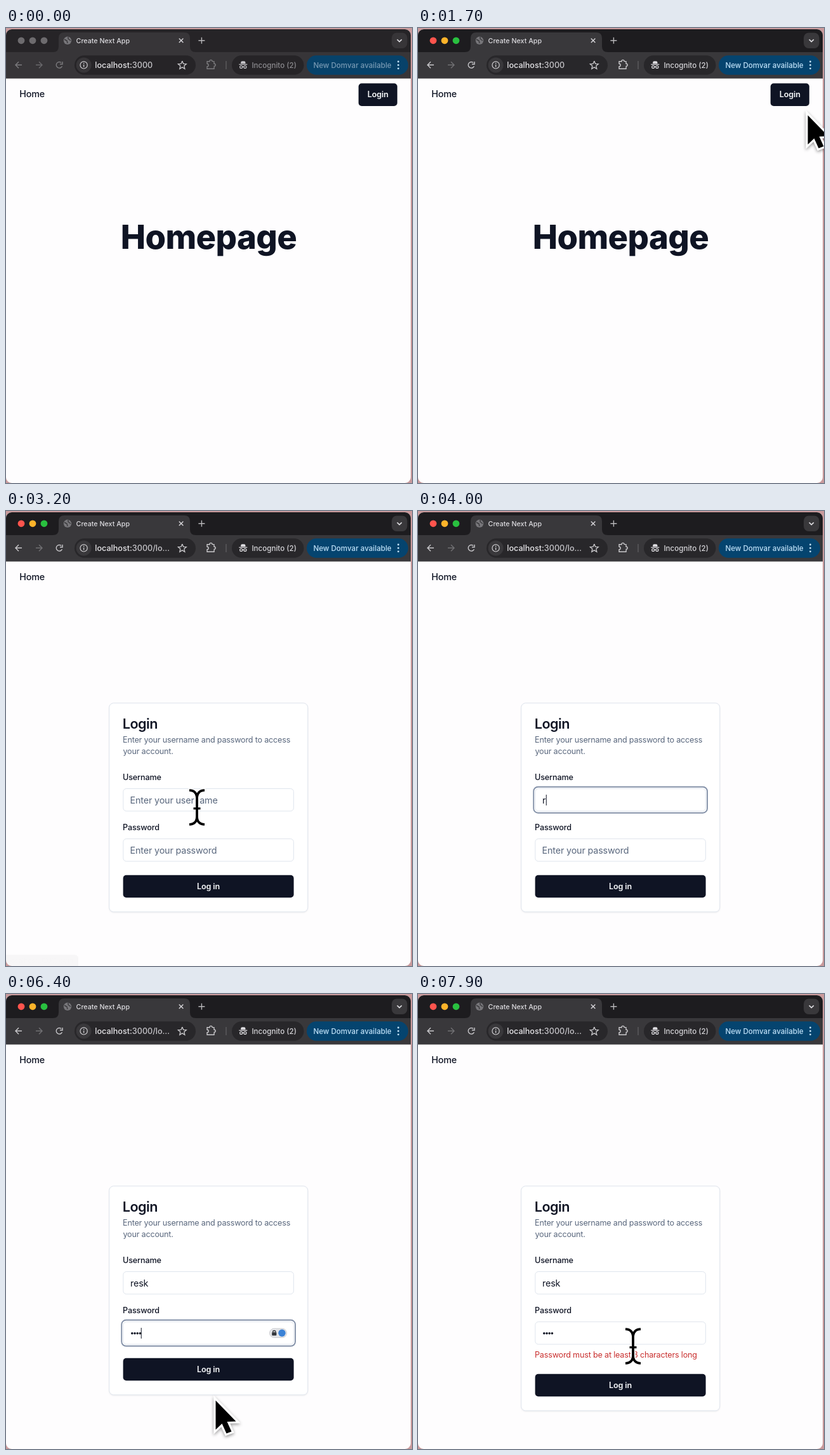
Animation of 640x717 px, one loop 8000 ms. Source, as an HTML page with a canvas:

```html
<!DOCTYPE html>
<html lang="en">
<head>
<meta charset="utf-8">
<title>Login flow</title>
<style>
html, body { margin: 0; width: 100%; height: 100%; overflow: hidden; background: #c99a9c; }
canvas { display: block; width: 640px; height: 717px; }
</style>
</head>
<body>
<canvas id="stage"></canvas>
<script>
const W = 640, H = 717, LOOP = 8000;
const canvas = document.getElementById('stage');
const ctx = canvas.getContext('2d');
const dpr = window.devicePixelRatio || 1;
canvas.width = W * dpr;
canvas.height = H * dpr;

const INK = '#0f1424', MUTED = '#59677d', BORDER = '#dfe5ed';
const T = {
  active: 500, selectStart: 520, deselect: 1250, hover: 1900, page: 2400,
  user: 3500, pass: 4600, submit: 6900, error: 7100
};
const userKeys = [4000, 4110, 4220, 4330];
const passKeys = [5100, 5200, 5300, 5400];
const userName = 'resk';

// Pointer tracks: [time, x, y]
const tracks = [
  [[250, 600, 300], [500, 252, 335], [900, 443, 342], [1200, 443, 342], [1700, 614, 137],
   [1950, 590, 108], [2500, 590, 108], [3200, 301, 467], [4000, 301, 467]],
  [[5900, 301, 467], [6400, 330, 640], [6800, 325, 600], [7100, 325, 600],
   [7800, 339, 555], [8000, 339, 555]]
];

const clamp = v => Math.max(0, Math.min(1, v));
const ease = v => v * v * (3 - 2 * v);
const countDone = (keys, t) => keys.filter(k => t >= k).length;

function box(x, y, w, h, r, fill, stroke, lw = 1) {
  ctx.beginPath();
  ctx.roundRect(x, y, w, h, r);
  if (fill) { ctx.fillStyle = fill; ctx.fill(); }
  if (stroke) { ctx.strokeStyle = stroke; ctx.lineWidth = lw; ctx.stroke(); }
}

function disc(x, y, r, fill) {
  ctx.beginPath();
  ctx.arc(x, y, r, 0, 7);
  ctx.fillStyle = fill;
  ctx.fill();
}

function ring(x, y, r, color, lw = 1.3, from = 0, to = Math.PI * 2) {
  ctx.beginPath();
  ctx.arc(x, y, r, from, to);
  ctx.strokeStyle = color;
  ctx.lineWidth = lw;
  ctx.stroke();
}

function line(color, lw, ...pts) {
  ctx.beginPath();
  pts.forEach(([x, y], i) => i ? ctx.lineTo(x, y) : ctx.moveTo(x, y));
  ctx.strokeStyle = color;
  ctx.lineWidth = lw;
  ctx.stroke();
}

function setFont(size, weight, track) {
  ctx.font = `${weight} ${size}px Inter, "Open Sans", sans-serif`;
  ctx.letterSpacing = track * size + 'px';
}

function text(str, x, y, size, color, weight = 400, track = 0, align = 'left') {
  setFont(size, weight, track);
  ctx.textAlign = align;
  ctx.fillStyle = color;
  ctx.fillText(str, x, y);
}

function navArrow(x, y, dir, color) {
  line(color, 1.4, [x - 5 * dir, y], [x + 5 * dir, y]);
  line(color, 1.4, [x, y - 5], [x + 5 * dir, y], [x, y + 5]);
}

function star(x, y, r, color) {
  const pts = [];
  for (let i = 0; i <= 10; i++) {
    const a = -Math.PI / 2 + i * Math.PI / 5, d = i % 2 ? r * .45 : r;
    pts.push([x + d * Math.cos(a), y + d * Math.sin(a)]);
  }
  line(color, 1.3, ...pts);
}

function puzzle(x, y, color) {
  ctx.beginPath();
  ctx.moveTo(x - 6, y - 4.5);
  ctx.lineTo(x - 2, y - 4.5);
  ctx.arc(x, y - 4.9, 2, Math.PI, 0);
  ctx.lineTo(x + 5, y - 4.5);
  ctx.lineTo(x + 5, y - 1);
  ctx.arc(x + 5.2, y + 1, 2, -Math.PI / 2, Math.PI / 2);
  ctx.lineTo(x + 5, y + 7);
  ctx.lineTo(x - 6, y + 7);
  ctx.lineTo(x - 6, y + 3.5);
  ctx.arc(x - 6, y + 1.2, 2.2, Math.PI / 2, -Math.PI / 2, true);
  ctx.closePath();
  ctx.strokeStyle = color;
  ctx.lineWidth = 1.4;
  ctx.stroke();
}

function hatIcon(x, y, color) {
  box(x - 3.6, y - 5.8, 7.2, 4, [2, 2, 0, 0], color);
  line(color, 1.3, [x - 6.5, y - .6], [x + 6.5, y - .6]);
  ring(x - 3.1, y + 3.4, 2, color, 1.2);
  ring(x + 3.1, y + 3.4, 2, color, 1.2);
  line(color, 1.1, [x - 1.2, y + 3], [x + 1.2, y + 3]);
}

function drawBrowser(t) {
  const on = t >= T.active;
  const strip = on ? '#1d1c1f' : '#262427';
  const bar = on ? '#39383b' : '#373538';
  const well = on ? '#28272a' : '#262427';
  const icon = on ? '#c9c8cb' : '#7c7b7e';
  const faint = on ? '#717073' : '#69686b';

  ctx.fillStyle = strip;
  ctx.fillRect(0, 2, 638, 36);
  const lights = on ? ['#ff544d', '#fdb32a', '#29c03f'] : ['#6d6b6e', '#6d6b6e', '#6d6b6e'];
  lights.forEach((c, i) => disc(24 + i * 18, 19.8, 5.4, c));

  ctx.beginPath();
  ctx.moveTo(74, 38);
  ctx.quadraticCurveTo(83, 38, 83, 29);
  ctx.lineTo(83, 16);
  ctx.quadraticCurveTo(83, 7, 92, 7);
  ctx.lineTo(281, 7);
  ctx.quadraticCurveTo(290, 7, 290, 16);
  ctx.lineTo(290, 29);
  ctx.quadraticCurveTo(290, 38, 299, 38);
  ctx.fillStyle = bar;
  ctx.fill();
  ctx.fillRect(0, 38, 638, 41.6);

  disc(97, 19.8, 6.2, '#77767a');
  line(bar, 1.4, [92, 18], [96, 20], [97, 24]);
  line(bar, 1.4, [98, 14], [98, 17], [102, 20]);
  text('Create Next App', 110.6, 23.5, 10.7, '#dddce0', 500);
  line('#d5d4d8', 1.4, [272.8, 16.5], [279.4, 23.1]);
  line('#d5d4d8', 1.4, [279.4, 16.5], [272.8, 23.1]);
  line('#b9b8bb', 1.4, [303.4, 19.8], [313.4, 19.8]);
  line('#b9b8bb', 1.4, [308.4, 14.8], [308.4, 24.8]);
  box(608, 7.5, 24.5, 24.5, 8, bar);
  line('#dddce0', 1.6, [616.6, 18.2], [620.2, 21.6], [623.8, 18.2]);

  navArrow(20, 58.3, -1, icon);
  navArrow(52, 58.3, 1, faint);
  ring(84, 58.3, 4.8, icon, 1.4, .4, 5.4);
  line(icon, 1.4, [89, 53], [89, 57], [85, 57]);

  box(108, 43.3, 191, 30.4, 15.2, well);
  disc(122.6, 58.4, 12, bar);
  ring(122.6, 58.4, 5.6, '#d0cfd2', 1.2);
  line('#d0cfd2', 1.3, [122.6, 57.8], [122.6, 61.4]);
  line('#d0cfd2', 1.3, [122.6, 55.1], [122.6, 56.4]);
  const host = 'localhost:';
  text(host, 140.3, 62.8, 12.6, '#e6e5e8', 450);
  const hostW = ctx.measureText(host).width;
  text(t < T.page ? '3000' : '3000/lo…', 140.3 + hostW, 62.8, 12.6, '#c7c6ca', 450);
  star(277.8, 58.8, 6.8, '#c9c8cb');

  puzzle(323, 57.3, icon);
  line('#646366', 1.2, [347, 52], [347, 65]);
  box(356, 43.3, 113.5, 30.4, 15.2, well);
  hatIcon(373.8, 58, on ? '#dddce0' : '#c5c4c8');
  text('Incognito (2)', 387.4, 62.7, 11.6, on ? '#d6d5d9' : '#8b8a8e', 500);

  box(474, 43.3, 160, 30.4, 15.2, on ? '#05446f' : '#07426a');
  text('New Domvar available', 484.4, 62.7, 11.6, on ? '#bfe1f8' : '#7799b3', 500);
  [53, 58.4, 63.8].forEach(y => disc(618.4, y, 1.4, '#c5e4f8'));
}

function drawHome(t) {
  const hover = t >= T.hover;
  box(555.7, 87.2, 61.1, 35.8, 5, hover ? '#272c3a' : INK);
  text('Login', 586.3, 109.2, 12.6, '#f8fafc', 600, -.01, 'center');

  const size = 52.6, track = -.012, word = 'Homepage';
  setFont(size, 800, track);
  const width = s => ctx.measureText(s).width;
  const x = 319.5 - width(word) / 2;
  if (t >= T.selectStart && t < T.deselect) {
    const n = 2 + Math.ceil(3 * clamp((t - T.selectStart) / 300));
    const a = x + width(word.slice(0, 2)), b = x + width(word.slice(0, n));
    ctx.fillStyle = '#a9d0fd';
    ctx.fillRect(a, 298.5, b - a, 61);
  }
  text(word, x, 348, size, INK, 800, track);
}

function drawCaret(x, y, t, since) {
  if ((t - since) % 1000 < 500) {
    ctx.fillStyle = INK;
    ctx.fillRect(x, y - 8.5, 1, 17);
  }
}

function drawField(y, focused) {
  box(184.8, y, 268.6, 35.4, 5, '#fff', BORDER);
  if (focused) box(182.2, y - 2.8, 273.8, 41, 7, null, '#8592a9', 1.9);
}

function drawKeyBadge(t) {
  const k = ease(clamp((t - 4650) / 500));
  const s = .72 + .28 * k;
  ctx.save();
  ctx.globalAlpha = k;
  ctx.translate(429, 534.3);
  ctx.scale(s, s);
  box(-13.5, -7.2, 27, 14.4, 7.2, '#e4e5e8', '#c3c5ca', .8);
  box(-9.8, -1.4, 7.2, 5.4, 1, '#33363b');
  ring(-6.2, -1.5, 2.3, '#33363b', 1.4, Math.PI, 0);
  disc(6, 0, 5.7, '#3b82d6');
  ctx.restore();
}

function drawLogin(t) {
  const push = t >= T.error ? 25 : 0;
  ctx.save();
  ctx.shadowColor = 'rgba(15,20,36,.09)';
  ctx.shadowBlur = 3;
  ctx.shadowOffsetY = 1;
  box(162.7, 302.7, 313, 329 + push, 7, '#fff');
  ctx.restore();
  box(162.7, 302.7, 313, 329 + push, 7, null, BORDER);

  text('Login', 183.8, 342.6, 21.6, INK, 600, -.025);
  text('Enter your username and password to access', 184, 364.9, 12.6, MUTED, 400, -.015);
  text('your account.', 184.4, 383, 12.6, MUTED, 400, -.015);

  const inUser = t >= T.user && t < T.pass;
  const inPass = t >= T.pass && t < T.submit;

  text('Username', 184, 424.3, 12.6, INK, 500, -.01);
  drawField(437.5, inUser);
  const typed = userName.slice(0, countDone(userKeys, t));
  text(typed || 'Enter your username', typed ? 196 : 195.6, 460.8, 14.3, typed ? INK : MUTED, 400, -.01);
  if (inUser) {
    const end = typed ? ctx.measureText(typed).width : 0;
    drawCaret(196.5 + end, 455.5, t, typed ? userKeys[typed.length - 1] : T.user);
  }

  text('Password', 184, 503, 12.6, INK, 500, -.01);
  drawField(516.6, inPass);
  const dots = countDone(passKeys, t);
  if (!dots) text('Enter your password', 195.6, 539.8, 14.3, MUTED, 400, -.01);
  for (let i = 0; i < dots; i++) disc(198.8 + i * 4.2, 534.8, 1.75, INK);
  if (inPass) {
    drawCaret(196.3 + dots * 4.1, 534.5, t, dots ? passKeys[dots - 1] : T.pass);
    drawKeyBadge(t);
  }

  if (push) text('Password must be at least 8 characters long', 184, 573, 12.6, '#c9302f', 400, -.015);
  box(184.6, 573.7 + push, 269, 35.6, 5, t >= 6780 && t < T.error ? '#272c3a' : INK);
  text('Log in', 319, 596.2 + push, 12.6, '#f8fafc', 600, -.01, 'center');
}

function drawStatus(t) {
  const alpha = clamp((t - T.hover) / 150) * clamp((3220 - t) / 600);
  if (!alpha) return;
  ctx.globalAlpha = alpha;
  box(0, 699.5, 114, 18, [0, 5, 0, 0], '#28272a');
  text('localhost:3000/login', 5, 712, 10.4, '#e3e2e5');
  ctx.globalAlpha = 1;
}

function pointerAt(t) {
  for (const track of tracks) {
    const i = track.findIndex(k => t < k[0]);
    if (i < 1) continue;
    const [t0, x0, y0] = track[i - 1], [t1, x1, y1] = track[i];
    const k = ease((t - t0) / (t1 - t0));
    return [x0 + (x1 - x0) * k, y0 + (y1 - y0) * k];
  }
  return null;
}

function overText(x, y, t) {
  const inside = (l, top, r, b) => x >= l && x <= r && y >= top && y <= b;
  if (t < T.page) return inside(178, 298, 461, 360);
  return inside(185, 437, 454, 473) || inside(185, 516, 454, t >= T.error ? 578 : 552);
}

function drawBeam(x, y) {
  ctx.save();
  ctx.translate(x, y);
  const pass = (color, stem, bar, pad) => {
    ctx.beginPath();
    for (const sx of [-1, 1]) {
      ctx.moveTo(sx * (12 + pad), -26.8);
      ctx.bezierCurveTo(sx * 4, -26.8, 0, -22, 0, -14);
      ctx.lineTo(0, 14);
      ctx.bezierCurveTo(0, 22, sx * 4, 26.8, sx * (12 + pad), 26.8);
    }
    ctx.strokeStyle = color;
    ctx.lineWidth = stem;
    ctx.stroke();
    line(color, bar, [-5.5 - pad, 1.8], [5.5 + pad, 1.8]);
  };
  pass('#fff', 7, 6.4, 1.5);
  pass('#000', 3.8, 3.2, 0);
  ctx.restore();
}

function drawArrow(x, y) {
  const shape = [[0, 0], [0, 46], [10, 36.5], [17, 52], [25, 49], [18, 33.5], [32, 33]];
  ctx.save();
  ctx.translate(x + .5, y + .4);
  ctx.beginPath();
  shape.forEach(p => ctx.lineTo(...p));
  ctx.closePath();
  ctx.shadowColor = 'rgba(0,0,0,.4)';
  ctx.shadowBlur = 5 * dpr;
  ctx.shadowOffsetY = 2 * dpr;
  ctx.strokeStyle = '#fff';
  ctx.lineWidth = 6.4;
  ctx.stroke();
  ctx.shadowColor = 'transparent';
  ctx.fillStyle = '#000';
  ctx.fill();
  ctx.restore();
}

function draw(t) {
  ctx.setTransform(dpr, 0, 0, dpr, 0, 0);
  ctx.fillStyle = '#c99a9c';
  ctx.fillRect(0, 0, W, H);
  ctx.save();
  ctx.beginPath();
  ctx.roundRect(0, 2, 638, 715, 9);
  ctx.clip();
  ctx.fillStyle = '#fefdfe';
  ctx.fillRect(0, 2, 638, 715);
  drawBrowser(t);
  text('Home', 21.2, 109.4, 14.3, INK, 450, -.01);
  if (t < T.page) drawHome(t); else drawLogin(t);
  drawStatus(t);
  ctx.restore();
  const p = pointerAt(t);
  if (p) (overText(...p, t) ? drawBeam : drawArrow)(...p);
}

const start = performance.now();
function tick() {
  draw((performance.now() - start) % LOOP);
  requestAnimationFrame(tick);
}
tick();
</script>
</body>
</html>
```
